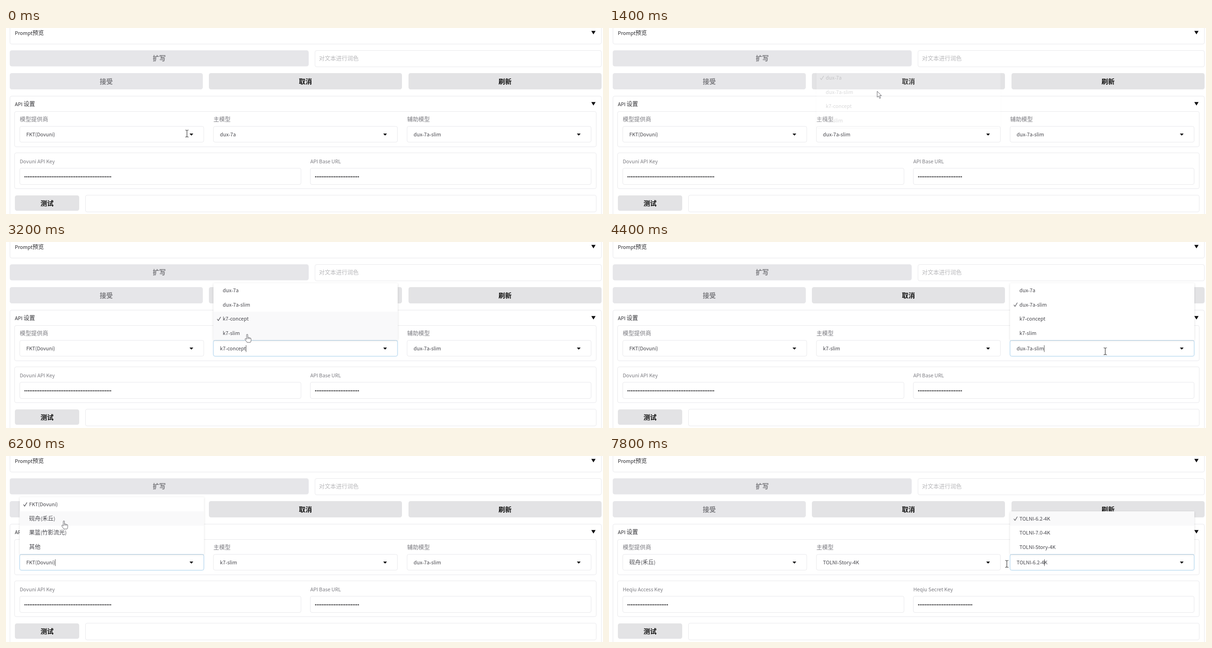
An HTML page for the animation above (8 s loop, 1280 by 400 pixels).

```html
<!DOCTYPE html>
<html lang="zh-CN">
<head>
<meta charset="utf-8">
<title>API 设置</title>
<style>
html, body { margin: 0; width: 100%; height: 100%; overflow: hidden; background: #fff; }
svg { display: block; width: 100vw; height: 100vh; }
text { font-family: "Noto Sans CJK SC", "Noto Sans CJK", "Noto Sans CJK JP", sans-serif; font-size: 12.2px; fill: #45454b; }
.title { fill: #2c2c30; }
.label { fill: #7b7b81; }
.hint { fill: #b8b8bb; }
.strong { font-size: 14px; font-weight: 700; fill: #111; text-anchor: middle; }
.off { fill: #7c7c80; }
.latin { font-size: .88em; }
.box { fill: #fff; stroke: #e9e9ec; }
.focus { stroke: #b4d6ee; filter: drop-shadow(0 0 1px #cfe6f7); }
.menu { fill: #fff; filter: drop-shadow(0 1px 2px #00000022); }
.dots { stroke: #18181b; stroke-width: 2.4; stroke-linecap: round; stroke-dasharray: 0 3.67; }
.check { fill: none; stroke: #45454b; stroke-width: 1.1; }
</style>
</head>
<body>
<svg viewBox="0 0 1280 400" preserveAspectRatio="none">
  <g id="page"></g>
  <g id="live"></g>
</svg>
<script>
const LOOP = 8000, STEP = 200, ROW = 30.6, MENU_BOTTOM = 211, SWITCH = 6600;
const COLUMNS = [29.5, 444.8, 860];
const PROVIDERS = ['FKT(Dovuni)', '砚舟(禾丘)', '果篮(竹影流光)', '其他'];
const MODELS_A = ['dux-7a', 'dux-7a-slim', 'k7-concept', 'k7-slim'];
const MODELS_B = ['TOLNI-6.2-4K', 'TOLNI-7.0-4K', 'TOLNI-Story-4K'];

// time, provider, main model, helper model (indexes into the lists)
const VALUES = [
  [0, 0, 0, 1], [1400, 0, 1, 1], [2400, 0, 2, 1], [3600, 0, 3, 1], [SWITCH, 1, 2, 0]
];
const MENUS = [
  { col: 1, from: 600, to: 1400, checked: 0 },
  { col: 1, from: 1800, to: 2400, checked: 1, active: 1 },
  { col: 1, from: 2800, to: 3600, checked: 2, active: 2 },
  { col: 2, from: 4200, to: 5000, checked: 1 },
  { col: 1, from: 5200, to: 5800, checked: 3, active: 3 },
  { col: 0, from: 5800, to: 6600, checked: 0 },
  { col: 1, from: 7000, to: 7400, checked: 2, active: 2 },
  { col: 2, from: 7400, to: 8200, checked: 0, active: 0, caretBack: 1 }
];
// time, x, y, pointer kind
const POINTER = [
  [0, 388, 227, 'beam'], [400, 560, 230, 'beam'], [600, 592, 231, 'beam'],
  [800, 588, 182, 'hand'], [1000, 572, 146, 'hand'], [1400, 579, 144, 'arrow'],
  [1600, 570, 226, 'beam'], [1800, 560, 229, 'beam'], [2000, 546, 180, 'hand'],
  [2200, 540, 174, 'hand'], [2400, 538, 182, 'arrow'], [2600, 532, 228, 'beam'],
  [3000, 525, 227, 'beam'], [3200, 519, 207, 'hand'], [3600, 530, 208, 'arrow'],
  [3800, 700, 230, 'beam'], [4200, 1040, 234, 'beam'], [4400, 1064, 235, 'beam'],
  [4800, 1010, 234, 'beam'], [5200, 640, 230, 'beam'], [5600, 268, 228, 'arrow'],
  [5800, 200, 228, 'beam'], [6000, 150, 182, 'hand'], [6200, 126, 148, 'hand'],
  [6600, 150, 150, 'arrow'], [6800, 480, 228, 'beam'], [7000, 560, 230, 'beam'],
  [7400, 934, 230, 'beam'], [7600, 915, 231, 'beam'], [7800, 853, 232, 'beam']
];

const latestIndex = (table, t) => table.findLastIndex(row => row[0] <= t);
const text = (x, y, s, cls = '') => `<text x="${x}" y="${y}" class="${cls}">` +
  s.replace(/[\x20-\x7e]+/g, '<tspan class="latin">$&</tspan>') + '</text>';
const box = (x, y, x2, y2, cls = '') =>
  `<rect x="${x + .5}" y="${y + .5}" width="${x2 - x - 1}" height="${y2 - y - 1}" rx="3.5" class="box ${cls}"/>`;
const button = (x, y, x2, y2, s, off) =>
  `<rect x="${x}" y="${y}" width="${x2 - x}" height="${y2 - y}" rx="4.5" fill="${off ? '#e6e6e9' : '#e3e3e5'}"/>` +
  text((x + x2) / 2, (y + y2) / 2 + 5, s, off ? 'strong off' : 'strong');
const triangle = (x, y, w, h) => `<path d="M${x - w} ${y - h}h${2 * w}l${-w} ${2 * h}z" fill="#09090b"/>`;
const dots = (x, count) => `<path class="dots" d="M${x + 1.8} 320h${(count - 1) * 3.67 + .1}"/>`;

const cursors = {
  beam: '<path d="M-3.5-7.5Q0-7.5 0-6Q0-7.5 3.5-7.5M0-6V6M-3.5 7.5Q0 7.5 0 6Q0 7.5 3.5 7.5" fill="none" stroke="#444" stroke-width="1.2"/>',
  arrow: '<path d="M-4-8V5L-1 2.3L1.3 7.5L3.4 6.5L1.2 1.5H5.2Z" fill="#fff" stroke="#66666b"/>',
  hand: '<path d="M-3.2 2.5V-7Q-3.2-8.6-1.9-8.6T-.6-7V-2Q.8-3 1.6-1.4Q3-2.2 3.9-.6Q6.4-1 6.4 1.4V4.5Q6.4 7 4.8 9H-2Q-3.6 6.5-5.8 3.6Q-7.2 1.4-5.8.6Q-4.6 0-3.2 2.5M-.6-2V1.5M1.6-1.4V1.6M3.9-.6V1.8" fill="#fff" stroke="#66666b"/>'
};

const page = document.getElementById('page'), live = document.getElementById('live');
page.innerHTML =
  box(8, -20, 1277, 35) + text(19, 14.5, 'Prompt预览', 'title') + triangle(1259.5, 10, 4.6, 3.8) +
  button(8, 48, 649, 82.5, '扩写', true) + box(662, 48, 1277, 84) + text(671, 70, '对文本进行润色', 'hint') +
  button(8, 97, 422, 132, '接受', true) + button(435, 97, 849, 132, '取消') + button(863, 97, 1277, 132, '刷新') +
  box(8, 146, 1277, 420) + text(19, 168, 'API 设置', 'title') + triangle(1259.5, 163, 4.6, 3.8) +
  box(18, 179, 1266, 256) +
  ['模型提供商', '主模型', '辅助模型'].map((s, i) => text(COLUMNS[i], 200.5, s, 'label')).join('') +
  box(18, 268, 1266, 346) + box(29, 301, 633, 337) + box(652, 301, 1255, 337) +
  button(19, 360, 157, 393, '测试') + box(170, 359, 1266, 396);

function pointerAt(t) {
  const i = latestIndex(POINTER, t), a = POINTER[i], b = POINTER[i + 1] || a;
  const k = b === a ? 0 : (t - a[0]) / (b[0] - a[0]);
  return { x: a[1] + (b[1] - a[1]) * k, y: a[2] + (b[2] - a[2]) * k, kind: a[3] };
}

function drawMenu(menu, options, t, pointer) {
  const x = COLUMNS[menu.col], top = MENU_BOTTOM - options.length * ROW;
  const closing = t >= menu.to;
  const opacity = closing ? .2 : Math.min(1, (t - menu.from + 120) / STEP);
  const hover = pointer.kind === 'hand' ? Math.floor((pointer.y - 8 - top) / ROW) : -1;
  const rows = options.map((s, i) => {
    const y = top + i * ROW, mid = y + ROW / 2;
    return (i === hover || i === menu.active ? `<rect x="${x}" y="${y}" width="395" height="${ROW}" fill="#f9f9fa"/>` : '') +
      (i === menu.checked ? `<path class="check" d="M${x + 8} ${mid + .5}l2.5 3.5l5-8"/>` : '') +
      text(x + 20, mid + 4.2, s);
  });
  return `<g opacity="${opacity}" transform="translate(0 ${(1 - opacity) * 4})">` +
    `<rect class="menu" x="${x}" y="${top}" width="395" height="${MENU_BOTTOM - top}" rx="2"/>${rows.join('')}</g>`;
}

function draw(t) {
  const second = t >= SWITCH, models = second ? MODELS_B : MODELS_A;
  const [, ...picked] = VALUES[latestIndex(VALUES, t)];
  const pointer = pointerAt(t);
  const shown = MENUS.filter(m => t >= m.from && t < m.to + STEP);
  const focused = shown.find(m => t < m.to - STEP);

  const fields = COLUMNS.map((x, i) =>
    box(x - .5, 211, x + 395, 246, focused?.col === i ? 'focus' : '') +
    `<g class="value">${text(x + 14, 233.2, (i ? models : PROVIDERS)[picked[i]])}</g>` +
    triangle(x + 368, 229.2, 4, 2.2));
  const keys = second ? ['Heqiu Access Key', 'Heqiu Secret Key'] : ['Dovuni API Key', 'API Base URL'];

  live.innerHTML = fields.join('') +
    text(29.5, 290.5, keys[0], 'label') + text(652.5, 290.5, keys[1], 'label') +
    dots(39, second ? 24 : 51) + dots(662, second ? 32 : 26) + '<path id="caret" stroke="#555"/>' +
    shown.map(m => drawMenu(m, m.col ? models : PROVIDERS, t, pointer)).join('') +
    `<g transform="translate(${pointer.x} ${pointer.y})">${cursors[pointer.kind]}</g>`;

  if (focused) {
    const label = live.querySelectorAll('.value text')[focused.col];
    const count = label.getNumberOfChars() - (focused.caretBack || 0);
    const x = COLUMNS[focused.col] + 14.5 + label.getSubStringLength(0, count);
    live.querySelector('#caret').setAttribute('d', `M${x} 222v14.5`);
  }
}

let last = -1;
function tick(now) {
  const t = Math.floor(now % LOOP / STEP) * STEP;
  if (t !== last) draw(last = t);
  requestAnimationFrame(tick);
}
draw(0);
requestAnimationFrame(tick);
</script>
</body>
</html>
```
